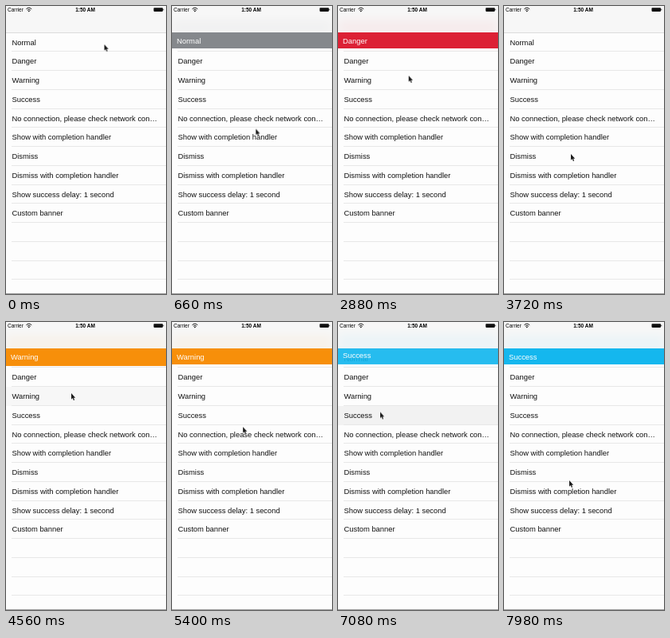
An HTML page for the animation above (8000 ms loop, 201x360 px).

```html
<!DOCTYPE html>
<html lang="en">
<head>
<meta charset="utf-8">
<title>Banner demo</title>
<style>
html, body { margin: 0; width: 100%; height: 100%; overflow: hidden; }
body { background: #fdfdfd; color: #111; font: 9.4px "Liberation Sans", Arial, sans-serif; }
#stage { position: relative; width: 201px; height: 360px; overflow: hidden; }
#stage > * { position: absolute; }

#list { top: 33.5px; left: 0; width: 201px; }
.row { position: relative; height: 23.75px; line-height: 23.75px; padding-left: 7.5px; white-space: nowrap; }
.row::after { content: ""; position: absolute; left: 7px; right: 0; bottom: 0; height: 1px; background: #e8e8e8; }
#hairline { left: 0; top: 33px; width: 201px; height: 1px; background: #dcdcdc; }
#edge { left: 0; top: 359px; width: 201px; height: 1px; background: #a0a0a0; }

.banner {
  left: 0; top: 33px; width: 195px; height: 20px; padding-left: 6px; line-height: 22px;
  color: #fff; background: var(--c); box-shadow: 0 -16px 12px var(--c);
  opacity: 0; animation: 8s linear infinite;
}
#nav { left: 0; top: 0; width: 201px; height: 33px; background: rgba(247, 247, 247, .95); }
#bar { left: 0; top: 0; }
#bar text { font: 6.5px "Liberation Sans", Arial, sans-serif; }
#bar .time { font-weight: bold; text-anchor: middle; }

/* banners slide out from beneath the navigation bar, a little tall, then settle */
.normal  { --c: #85888c; animation-name: normal; }
.danger  { --c: #dc2135; animation-name: danger; }
.warning { --c: #f78f0a; animation-name: warning; }
.success { --c: #14b7ee; animation-name: success; }
.banner { --in: cubic-bezier(.1, .8, .3, 1); --up: translateY(-20px); }
@keyframes normal {
  0%, .374% { opacity: 0; transform: var(--up); }
  .375% { opacity: .25; transform: var(--up); height: 23px; animation-timing-function: var(--in); }
  2.625% { opacity: 1; transform: none; height: 22px; }
  4.5% { opacity: 1; transform: none; height: 20px; }
  15.125% { opacity: 1; transform: none; height: 20px; animation-timing-function: ease-in-out; }
  17.625% { opacity: .25; transform: var(--up); }
  17.626%, 100% { opacity: 0; transform: var(--up); }
}
@keyframes danger {
  0%, 26.624% { opacity: 0; transform: var(--up); }
  26.625% { opacity: .25; transform: var(--up); height: 23px; animation-timing-function: var(--in); }
  28.875% { opacity: 1; transform: none; height: 22px; }
  30.75% { opacity: 1; transform: none; height: 20px; }
  43% { opacity: 1; transform: none; height: 20px; animation-timing-function: ease-in-out; }
  45.5% { opacity: .25; transform: var(--up); }
  45.501%, 100% { opacity: 0; transform: var(--up); }
}
@keyframes warning {
  0%, 54.874% { opacity: 0; transform: var(--up); }
  54.875% { opacity: .25; transform: var(--up); height: 23px; animation-timing-function: var(--in); }
  57.125% { opacity: 1; transform: none; height: 22px; }
  59% { opacity: 1; transform: none; height: 20px; }
  73.25% { opacity: 1; transform: none; height: 20px; animation-timing-function: ease-in-out; }
  75.75% { opacity: .25; transform: var(--up); }
  75.751%, 100% { opacity: 0; transform: var(--up); }
}
@keyframes success {
  0%, 87.124% { opacity: 0; transform: var(--up); }
  87.125% { opacity: .25; transform: var(--up); height: 23px; animation-timing-function: var(--in); }
  89.375% { opacity: 1; transform: none; height: 22px; }
  91.25%, 100% { opacity: 1; transform: none; height: 20px; }
}

/* tapped rows flash grey and fade */
.tap { --hit: #e9e9e9; animation: 8s linear infinite; }
.t1 { animation-name: tap-normal; }
.t2 { animation-name: tap-danger; }
.t3 { animation-name: tap-warning; }
.t4 { animation-name: tap-success; }
.t5 { animation-name: tap-dismiss; }
@keyframes tap-normal {
  0%, .374%, 3.5%, 100% { background-color: #fdfdfd; }
  .375% { background-color: var(--hit); }
}
@keyframes tap-danger {
  0%, 26.624%, 29.75%, 100% { background-color: #fdfdfd; }
  26.625% { background-color: var(--hit); }
}
@keyframes tap-warning {
  0%, 54.874%, 58%, 100% { background-color: #fdfdfd; }
  54.875% { background-color: var(--hit); }
}
@keyframes tap-success {
  0%, 87.124%, 90.25%, 100% { background-color: #fdfdfd; }
  87.125% { background-color: var(--hit); }
}
@keyframes tap-dismiss {
  0%, 15.124%, 18.25%, 42.999%, 46.125%, 73.249%, 76.375%, 100% { background-color: #fdfdfd; }
  15.125%, 43%, 73.25% { background-color: var(--hit); }
}

#cursor { left: 0; top: .5px; overflow: visible; animation: point 8s ease-in-out infinite; }
@keyframes point {
  0%, 6.75% { transform: translate(123.5px, 47px); }
  9%, 17.25% { transform: translate(100px, 183px); }
  19.5% { transform: translate(104px, 57px); }
  21%, 22.75% { transform: translate(102px, 64px); }
  24% { transform: translate(97px, 71px); }
  35% { transform: translate(97px, 71px); animation-timing-function: linear; }
  36% { transform: translate(88.7px, 86px); }
  41.25%, 48.25% { transform: translate(84px, 184px); }
  53.25%, 64% { transform: translate(82px, 88px); }
  71.25%, 76.9% { transform: translate(97px, 177px); }
  83.25%, 96.1% { transform: translate(53px, 111.5px); }
  99.75%, 100% { transform: translate(82px, 197px); }
}
</style>
</head>
<body>
<div id="stage">
  <div id="list">
    <div class="row tap t1">Normal</div>
    <div class="row tap t2">Danger</div>
    <div class="row tap t3">Warning</div>
    <div class="row tap t4">Success</div>
    <div class="row">No connection, please check network con…</div>
    <div class="row">Show with completion handler</div>
    <div class="row tap t5">Dismiss</div>
    <div class="row">Dismiss with completion handler</div>
    <div class="row">Show success delay: 1 second</div>
    <div class="row">Custom banner</div>
    <div class="row"></div>
    <div class="row"></div>
    <div class="row"></div>
  </div>
  <div id="hairline"></div>
  <div id="edge"></div>

  <div class="banner normal">Normal</div>
  <div class="banner danger">Danger</div>
  <div class="banner warning">Warning</div>
  <div class="banner success">Success</div>

  <div id="nav"></div>
  <svg id="bar" width="201" height="10">
    <text x="2" y="7">Carrier</text>
    <path d="M25.4 3.8Q28.8 .6 32.2 3.8M26.8 5.3Q28.8 3.4 30.8 5.3" fill="none" stroke="#111" stroke-width="1"/>
    <path d="M27.6 6.2Q28.8 5.2 30 6.2L28.8 7.5z" fill="#111"/>
    <text class="time" x="99.5" y="7">1:50 AM</text>
    <rect x="185.5" y="2.2" width="11.5" height="4.7" rx=".8" fill="#111"/>
    <rect x="197.4" y="3.6" width=".8" height="1.8" fill="#111"/>
  </svg>

  <svg id="cursor" width="8" height="12">
    <path d="M0 0V7.7L1.7 6.1L2.9 9L4.1 8.5L3 5.7H5.2z" fill="#1c1c1c" stroke="#fff" stroke-width=".9" paint-order="stroke"/>
  </svg>
</div>
</body>
</html>
```
